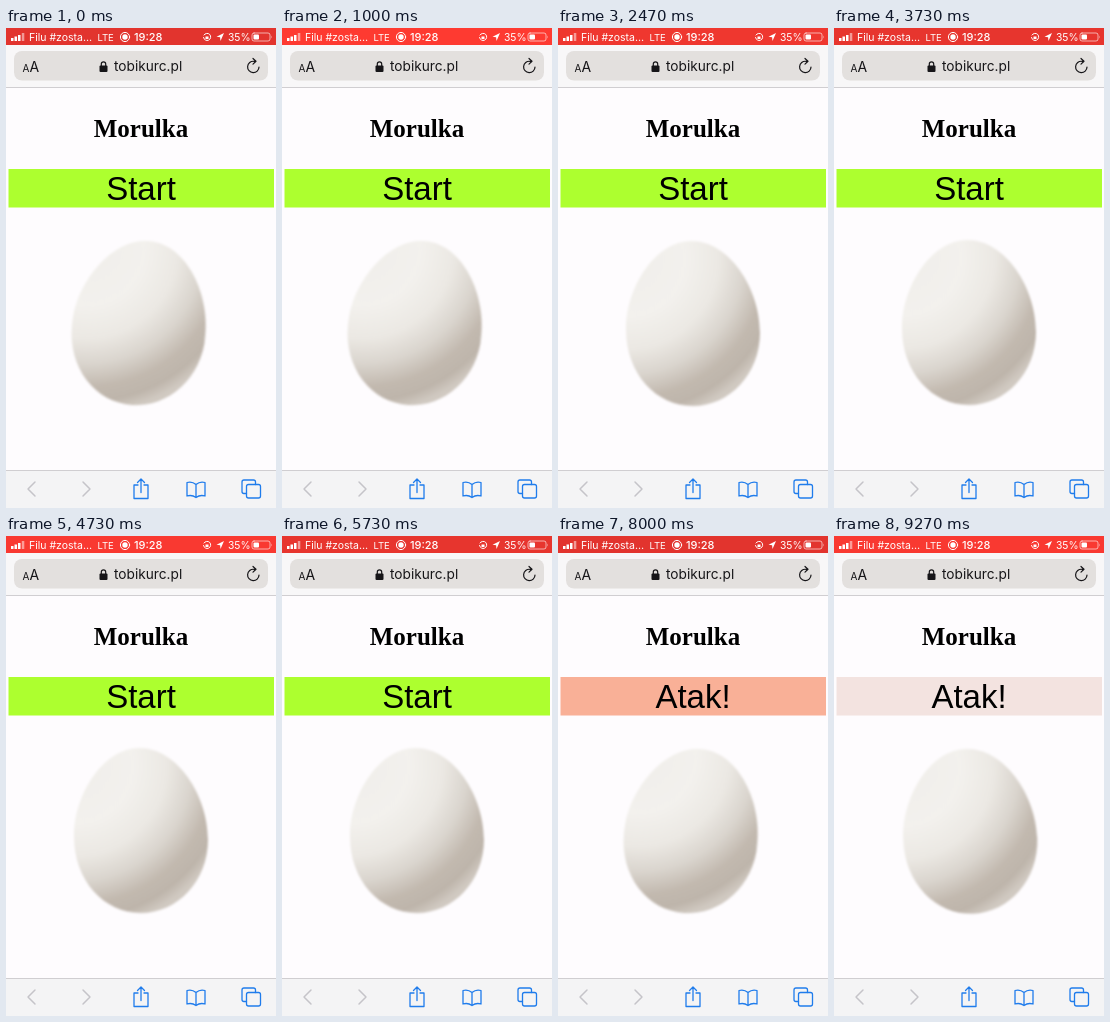
Write an HTML page that moves like this. It is 270 px wide and 480 px high and loops after 9.34 s.

```html
<!DOCTYPE html>
<html lang="pl">
<head>
<meta charset="utf-8">
<title>Morulka</title>
<style>
  html, body { margin: 0; height: 100%; overflow: hidden; background: #fefcfe; }
  svg { display: block; width: 100%; height: 100%; }
  text { font-family: Inter, sans-serif; }
  .line { fill: none; stroke-linecap: round; stroke-linejoin: round; }
  .title { font: bold 25px "Liberation Serif", serif; }
  .label { font: 33px "Liberation Sans", sans-serif; }
</style>
</head>
<body>
<svg viewBox="0 0 270 480">
  <defs>
    <radialGradient id="shell" gradientUnits="userSpaceOnUse" cx="70" cy="230" r="165">
      <stop offset="0" stop-color="#f0eeea"/>
      <stop offset=".35" stop-color="#f3f1ed"/>
      <stop offset=".55" stop-color="#ebe8e3"/>
      <stop offset=".7" stop-color="#dad5ce"/>
      <stop offset=".84" stop-color="#c2b9af"/>
      <stop offset=".93" stop-color="#beb5ab"/>
      <stop offset="1" stop-color="#d0c9c1"/>
    </radialGradient>
    <filter id="soft"><feGaussianBlur stdDeviation=".8"/></filter>
    <path id="outline" d="M133 212.500C171 212 202 260 202 304C202 346 171 377.500 135 377.500C98 377.500 68 345 68 301C68 258 98 212.500 133 212.500Z"/>
  </defs>

  <rect width="270" height="480" fill="#fefcfe"/>

  <!-- status bar -->
  <rect id="status" width="270" height="17"/>
  <g fill="#fff">
    <path d="M5 10h2.500v3H5zM8.500 8.500H11V13H8.500zM12 7h2.500v6H12z"/>
    <path d="M15.800 5h2.500v8h-2.500z" opacity=".5"/>
    <text x="23" y="12.500" font-size="10.500">Filu #zosta…</text>
    <text x="91.500" y="12.500" font-size="9.500">LTE</text>
    <text x="128" y="12.700" font-size="11" font-weight="500">19:28</text>
    <circle cx="119" cy="9" r="2.700"/>
    <path d="M218 5l-7.500 3.700 3.600.5.400 3.800z"/>
    <text x="222" y="12.500" font-size="10.300">35%</text>
    <rect x="247.500" y="6.500" width="5.500" height="5" rx="1"/>
    <path d="M265.300 7.500q1.500 1.500 0 3z" opacity=".6"/>
    <rect x="199.500" y="8.500" width="3" height="2.500"/>
  </g>
  <g class="line" stroke="#fff">
    <circle cx="119" cy="9" r="4.600"/>
    <path d="M198 7a3.600 3.600 0 1 1-.5 2.500"/>
    <rect x="246" y="5" width="18" height="8" rx="2" opacity=".6"/>
  </g>

  <!-- address bar -->
  <rect y="17" width="270" height="42" fill="#f8f7f8"/>
  <path d="M0 59.500h270" stroke="#d0ced1"/>
  <rect x="8" y="23" width="254" height="29.500" rx="8" fill="#e3e0de"/>
  <g fill="#161518">
    <text x="16.500" y="43.500" font-size="10">A</text>
    <text x="23.500" y="43.500" font-size="14">A</text>
    <rect x="93.500" y="37.500" width="8" height="6.500" rx="1"/>
    <text x="108" y="43" font-size="13.700">tobikurc.pl</text>
  </g>
  <g class="line" stroke="#161518" stroke-width="1.200">
    <path d="M95.300 38v-2a2.200 2.200 0 0 1 4.400 0v2"/>
    <path d="M253 39a5.700 5.700 0 1 1-5-5.700h1.500M247 30.500l3 2.800-3 2.800"/>
  </g>

  <!-- page -->
  <text class="title" x="135" y="109" text-anchor="middle">Morulka</text>
  <rect id="button" x="2.500" y="141" width="265.500" height="38.500"/>
  <text id="label" class="label" x="135" y="172" text-anchor="middle"></text>
  <g id="egg">
    <use href="#outline" fill="url(#shell)" filter="url(#soft)"/>
  </g>

  <!-- toolbar -->
  <rect y="442" width="270" height="38" fill="#f4f4f5"/>
  <path d="M0 442.500h270" stroke="#d0ced1"/>
  <g class="line" stroke="#c5c4c9" stroke-width="1.500">
    <path d="M29 454l-7 7 7 7M77 454l7 7-7 7"/>
  </g>
  <g class="line" stroke="#1f7cec" stroke-width="1.300">
    <path d="M132 457h-4v13.500h14V457h-4M135 464.500v-13M131.500 454.500l3.500-3.500 3.500 3.500"/>
    <path d="M190 456.500q-4-3.500-9-2v13.500q5-1.500 9 1.500q4-3 9-1.500v-13.500q-5-1.500-9 2v13"/>
    <path d="M240.500 465.500H238a2 2 0 0 1-2-2V454a2 2 0 0 1 2-2h9.500a2 2 0 0 1 2 2v2.500"/>
    <rect x="240.500" y="456.500" width="14" height="13.500" rx="2"/>
  </g>
</svg>
<script>
  const LOOP = 9340, STEP = 1000 / 15, SWAY = 1000, PULSE = 2000;
  const ATTACK = 6790, FADE = 3000;
  const CORAL = [255, 127, 80], ICE = [240, 248, 255];
  const DARK_RED = [226, 52, 46], BRIGHT_RED = [254, 58, 49];
  // phase, dx, dy, degrees
  const SWAY_KEYS = [
    [0, -1, 0, 10],
    [.27, 1, .3, -2],
    [.47, 0, .5, 0],
    [.73, 0, -.5, 0],
    [1, -1, 0, 10]
  ];
  const [status_, button, label, egg] =
    ['status', 'button', 'label', 'egg'].map(id => document.getElementById(id));
  const mix = (a, b, p) => a.map((v, i) => v + (b[i] - v) * p);
  const blend = (a, b, p) => `rgb(${mix(a, b, p).map(Math.round)})`;

  function swayAt(phase) {
    const next = SWAY_KEYS.findIndex(key => key[0] > phase);
    const from = SWAY_KEYS[next - 1], to = SWAY_KEYS[next];
    const p = (phase - from[0]) / (to[0] - from[0]);
    return mix(from, to, p * p * (3 - 2 * p));
  }

  function draw(now) {
    const t = Math.floor((now % LOOP) / STEP + .05) * STEP;
    const [, dx, dy, angle] = swayAt((t % SWAY) / SWAY);
    egg.setAttribute('transform', `translate(${dx} ${dy}) rotate(${angle} 135 295)`);

    const glow = (1 - Math.cos(2 * Math.PI * t / PULSE)) / 2;
    status_.setAttribute('fill', blend(DARK_RED, BRIGHT_RED, glow));

    const attacking = t >= ATTACK;
    label.textContent = attacking ? 'Atak!' : 'Start';
    button.setAttribute('fill', attacking
      ? blend(CORAL, ICE, (t - ATTACK) / FADE)
      : '#adff2f');
  }

  const start = performance.now();
  function tick() {
    draw(performance.now() - start);
    requestAnimationFrame(tick);
  }
  tick();
</script>
</body>
</html>
```
